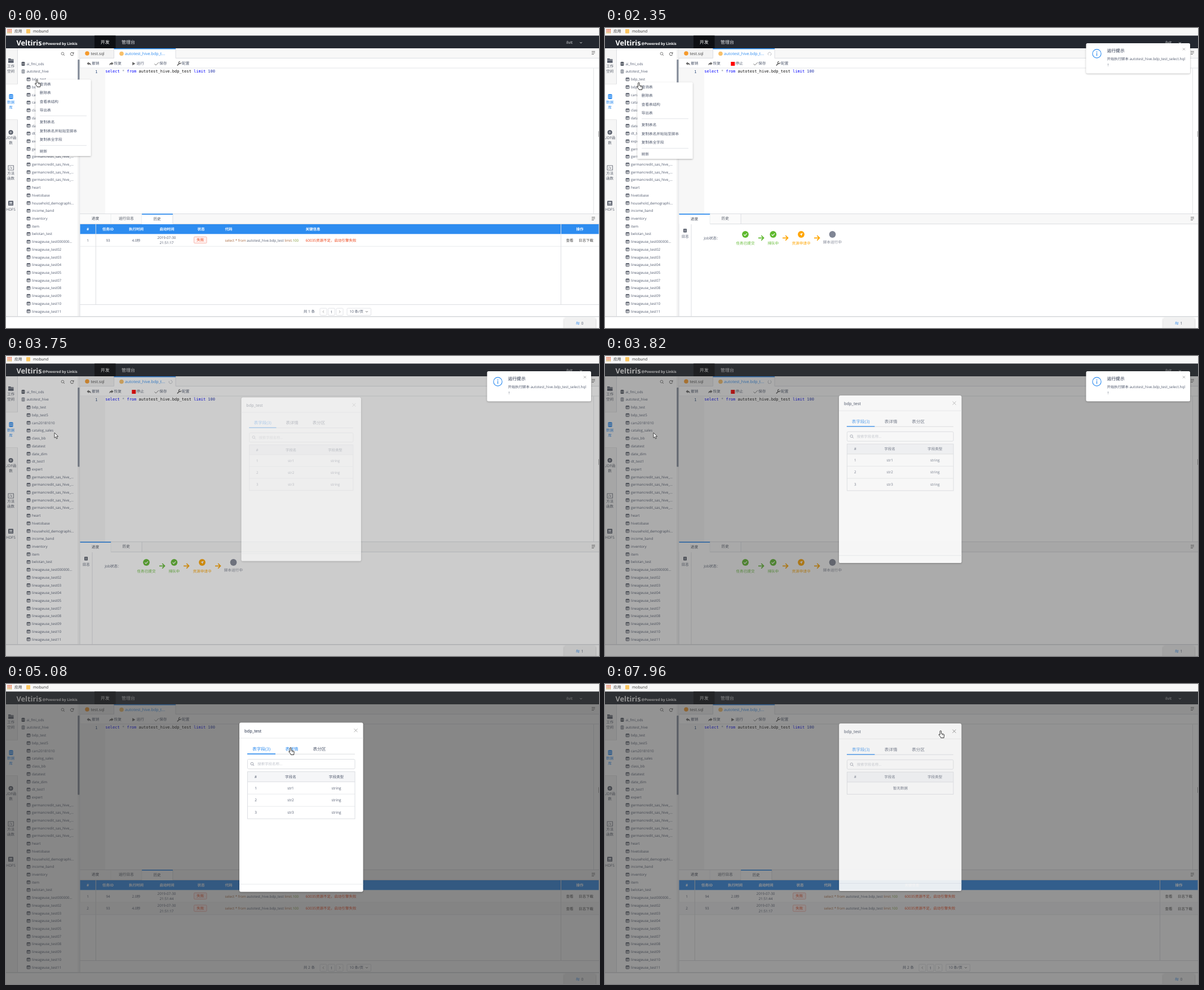
An HTML page that plays this animation: 1052x532 px, repeating every 8 s.

```html
<!DOCTYPE html>
<html lang="zh-CN">
<head>
<meta charset="utf-8">
<title>SQL workbench</title>
<style>
html, body { margin: 0; width: 100%; height: 100%; overflow: hidden; background: #fff; }
svg { display: block; width: 100%; height: 100%; }
text { font-family: "Open Sans", "Noto Sans CJK SC", "Noto Sans CJK", sans-serif; text-rendering: geometricPrecision; white-space: pre; }
.code { font-family: "DejaVu Sans Mono", "Noto Sans Mono", monospace; }
</style>
</head>
<body>
<svg id="stage" viewBox="0 0 1052 532" xmlns="http://www.w3.org/2000/svg"></svg>
<script>
const LOOP = 8000, BLUE = '#2d8cf0', INK = '#515a6e', LINE = '#dcdee2';
const GREEN = '#5fb92f', ORANGE = '#ffa500', GREY = '#808695';

// Drawing helpers; text y is the middle of the line
const rect = (x, y, w, h, fill, more = '') => `<rect x="${x}" y="${y}" width="${w}" height="${h}" fill="${fill}" ${more}/>`;
const line = (x1, y1, x2, y2, c = LINE, w = 1) => `<path d="M${x1} ${y1}L${x2} ${y2}" stroke="${c}" stroke-width="${w}"/>`;
const dot = (x, y, r, fill, more = '') => `<circle cx="${x}" cy="${y}" r="${r}" fill="${fill}" ${more}/>`;
const stroke = (d, c, w = 1) => `<path d="${d}" fill="none" stroke="${c}" stroke-width="${w}"/>`;
const shape = (d, c) => `<path d="${d}" fill="${c}"/>`;
const text = (x, y, s, size = 6.5, fill = INK, more = '') =>
  `<text x="${x}" y="${y + size * .36}" font-size="${size}" fill="${fill}" ${more}>${s}</text>`;
const mid = (x, y, s, size, fill, more = '') => text(x, y, s, size, fill, 'text-anchor="middle" ' + more);
const group = (id, body, more = '') => `<g id="${id}" ${more}>${body}</g>`;
const span = (s, c) => `<tspan fill="${c}">${s}</tspan>`;
const at = (x, y, body) => `<g transform="translate(${x} ${y})">${body}</g>`;

const lens = (x, y, c) => dot(x - .6, y - .6, 2.3, 'none', `stroke="${c}" stroke-width=".8"`) + line(x + 1.1, y + 1.1, x + 3, y + 3, c, .9);
const lines3 = (x, y) => [-2.5, 0, 2.5].map((d, i) => line(x - 3, y + d, x + (i == 2 ? 1 : 3), y + d, '#666', .9)).join('');
const cross = (x, y, r, c) => stroke(`M${x - r} ${y - r}l${2 * r} ${2 * r}m0 ${-2 * r}l${-2 * r} ${2 * r}`, c, .8);
const chevron = (x, y, c) => stroke(`M${x - 2} ${y - 1}l2 2l2 -2`, c, .8);
const disks = (x, y, c) => rect(x - 3, y - 3.5, 6, 7, c, 'rx="1.6"') + line(x - 3, y - 1, x + 3, y - 1, '#fff', .6) + line(x - 3, y + 1.2, x + 3, y + 1.2, '#fff', .6);
const grid = (x, y) => rect(x - 2.9, y - 2.6, 5.8, 5.4, '#fff', 'stroke="#555b68" stroke-width=".9" rx=".8"') +
  rect(x - 2.9, y - 2.6, 5.8, 1.8, '#555b68') + line(x - 2.9, y + 1, x + 2.9, y + 1, '#555b68', .6) + line(x - .8, y - 1, x - .8, y + 2.8, '#555b68', .6);

function topBars() {
  let s = rect(0, 0, 1052, 14, '#f7f7f7');
  const hues = ['#e8663c', '#e8663c', '#d9a03a'];
  for (let i = 0; i < 9; i++) s += rect(2.5 + i % 3 * 2.8, 1.8 + (i / 3 | 0) * 2.8, 1.9, 1.9, hues[i / 3 | 0]);
  s += text(15, 6, '应用', 6.8, '#333') + rect(36, 2, 7, 7.5, '#fbc661', 'rx=".8"') + text(48, 6, 'mobund', 6.8, '#333');
  s += rect(0, 13.5, 1052, 22.5, '#23272f') + rect(157, 13.5, 37.5, 22.5, '#0d0f13');
  s += text(18.5, 26, 'Veltiris', 12.8, '#fff', 'font-weight="700"') + text(64.5, 28, '@Powered by Linkis', 6.3, '#fff', 'font-weight="700"');
  s += mid(175.7, 25, '开发', 8, '#fff', 'font-weight="500"') + mid(217, 25, '管理台', 8, '#e3e5e8');
  return s + text(994, 25, 'ilvit', 7, '#e3e5e8') + chevron(1020, 26, '#e3e5e8');
}

function sideBar() {
  const item = (y, a, b, c = '#555b68') => mid(8.6, y, a, 6.6, c) + mid(8.6, y + 9, b, 6.6, c);
  let s = rect(0, 36, 20.5, 476, '#f6f6f6') + rect(0, 99.5, 21, 63, '#fff') + line(20.5, 36, 20.5, 99.5) + line(20.5, 162.5, 20.5, 512);
  s += line(0, 99.5, 20.5, 99.5, '#e8e8e8') + line(0, 162.5, 20.5, 162.5, '#e8e8e8');
  s += shape('M4 54h4l1 1.2h4.5v6.6h-9.5z', '#555b68') + line(4, 57, 13.5, 57, '#f6f6f6', .6) + item(67.5, '工作', '空间');
  s += at(9, 121.5, `<g transform="scale(1.25)">${disks(0, 0, BLUE)}</g>`) + item(131.5, '数据', '库', BLUE);
  s += dot(8.6, 185, 2.9, 'none', 'stroke="#555b68" stroke-width="2.4"') + dot(8.6, 185, 1, '#555b68') + item(194.8, 'UDF函', '数');
  s += rect(4, 244, 9.5, 8, 'none', 'stroke="#555b68" stroke-width=".8"') + mid(8.7, 248, '/x', 6, '#555b68') + item(258, '方法', '函数');
  s += rect(4, 306.5, 9, 8.5, '#555b68', 'rx="1"') + rect(5.8, 308.5, 5.4, 3, '#cfd2d8') + line(5, 313.3, 12, 313.3, '#fff', .7);
  return s + mid(8.6, 321.7, 'HDFS', 6.4, '#555b68');
}

function tree() {
  const german = Array(5).fill('germancredit_sas_hive_...');
  const uses = ['000000...', '02', '03', '04', '05', '07', '08', '09', '10', '11'].map(n => 'lineageuse_test' + n);
  const names = ['bdp_test', 'bdp_test5', 'cars20181010', 'catalog_sales', 'class_bb', 'datatest', 'date_dim', 'dt_test1', 'expert',
    ...german, 'heart', 'hivetobase', 'household_demographi...', 'income_band', 'inventory', 'item', 'belotan_test', ...uses];
  let s = lens(101, 46, '#666') + stroke('M119.3 44.6a2.7 2.7 0 1 0 .4 2.2', '#444', .9) + shape('M120.4 42.8v2.8h-2.8z', '#444');
  s += disks(30.5, 63.5, '#444a55') + text(36.5, 63.5, 'ai_fmi_ods', 6.3);
  s += disks(30.5, 77, '#8a8f99') + text(36.5, 77, 'autotest_hive', 6.3);
  names.forEach((n, i) => { const y = 91 + i * 13.71; s += grid(40, y) + text(46, y, n, 6.25); });
  return s + rect(127, 36, 4, 476, '#f3f3f3') + rect(127.3, 56, 3.4, 140.5, '#838b99', 'rx="1"') + line(131, 36, 131, 512);
}

function editor() {
  let s = rect(131.5, 36, 920, 17.5, '#f8f8f8') + rect(131.5, 36, 60, 17.5, '#f3f3f3') + rect(191.5, 36, 109.5, 18, '#fff');
  s += line(191.5, 36, 191.5, 53.5) + line(301, 36, 301, 53.5) + line(131, 53.5, 191.5, 53.5) + line(301, 53.5, 1052, 53.5);
  s += rect(191.5, 36, 109.5, 1.6, BLUE) + dot(144, 45, 3.8, '#f59a2c') + text(150.5, 45, 'test.sql', 7.2, '#444');
  s += dot(205, 45.5, 3.8, '#f7c06a') + text(211, 45.5, 'autotest_hive.bdp_t...', 7.15, BLUE) + lines3(1042, 44);
  s += line(131, 71, 1052, 71, '#e3e5e8');
  const undo = 'M0 -.3l3.2 -3v1.8q3.8 0 4 4.4q-1.2 -2 -4 -2v1.8z';
  s += at(143.5, 63.3, shape(undo, '#666')) + text(152, 63, '撤销', 6.7);
  s += at(190.5, 63.3, `<g transform="scale(-1 1)">${shape(undo, '#666')}</g>`) + text(191.5, 63, '恢复', 6.7);
  s += stroke('M263.5 63.5l2.4 2.4l5 -5', '#666', .9) + text(272, 63, '保存', 6.7);
  s += stroke('M303.8 66.5l4 -4', '#555', 1.5) + stroke('M310.5 61.2a2 2 0 1 1 -1.8 -1.8', '#555', 1.2) + text(312, 63, '配置', 6.7);
  s += rect(131.5, 71.5, 44.5, 258, '#f7f7f7') + mid(160.3, 77, '1', 7, '#2b4a7a', 'class="code"');
  const sql = span('select', '#0000ff') + span(' * ', '#778899') + span('from', '#0000ff') + ' autotest_hive.bdp_test ' +
    span('limit', '#0000ff') + span(' 100', '#2233aa');
  s += text(176.3, 76.7, sql, 7.04, '#111', 'class="code"');
  s += line(1042.5, 71, 1042.5, 329, '#e3e5e8') + line(1051.5, 183, 1051.5, 193, '#aaa');
  s += group('play', shape('M224.2 60.2l5.2 3l-5.2 3z', '#666') + text(231.5, 63, '运行', 6.7));
  s += group('stop', rect(223.3, 60, 7, 7, '#f00', 'rx=".6"') + text(231.5, 63, '停止', 6.7));
  return s + group('spin', stroke('M2.9 0a2.9 2.9 0 1 1 -1.2 -2.35', '#b9bcc2', .9));
}

function panelTabs(names, active) {
  let s = rect(131.5, 330, 920, 17.5, '#f8f8f8') + line(131, 329.5, 1052, 329.5) + line(131, 347.5, 1052, 347.5);
  names.forEach((n, i) => {
    const x = 131.5 + i * 54.8, on = i == active;
    s += rect(x, 330, 54.8, on ? 18 : 17, on ? '#fff' : '#fbfbfb') + line(x + 54.8, 330, x + 54.8, 347.5);
    if (on) s += rect(x, 329.3, 54.8, 1.7, BLUE);
    s += mid(x + 27, on ? 339 : 338, n, 6.7, '#444b59');
  });
  return s + lines3(1042, 338);
}

function history(rows) {
  let s = panelTabs(['进度', '运行日志', '历史'], 2) + rect(131.5, 348, 920, 17.3, BLUE);
  const heads = [[145, '#'], [181, '任务ID'], [231, '执行时间'], [285.5, '启动时间'], [346, '状态'], [1018, '操作']];
  const bold = 'font-weight="700"';
  heads.forEach(([x, n]) => s += mid(x, 356.7, n, 6.5, '#fff', bold));
  s += text(388.5, 356.7, '代码', 6.5, '#fff', bold) + text(531.5, 356.7, '关键信息', 6.5, '#fff', bold);
  const sql = span('select * from', '#a8673c') + ' autotest_hive.bdp_test' + span(' limit', '#a8673c') + span('.100', '#7f9b35');
  rows.forEach(([id, cost, clock], i) => {
    const y = 376.3 + i * 21.7;
    if (i) s += rect(131.5, y - 10.8, 920, 21.7, '#f8f8f9');
    s += line(131, y + 10.9, 1052, y + 10.9, '#e8eaec') + mid(145, y, i + 1, 6.3) + mid(181, y, id, 6.3) + mid(231, y, cost + '秒', 6.3);
    s += mid(285, y - 5, '2019-07-30', 6.3) + mid(285, y + 4.8, clock, 6.3);
    s += rect(333.5, y - 6, 22.5, 11.3, '#fff1f0', 'rx="1.5" stroke="#f5a89c" stroke-width=".8"') + mid(344.7, y - .3, '失败', 6.5, '#ed4014');
    s += text(388.5, y, sql, 6.2) + text(531.5, y, '60035资源不足，启动引擎失败', 6.5, '#ed4014');
    s += mid(1000, y + .5, '查看', 6.6, '#444') + mid(1029, y + .5, '日志下载', 6.6, '#444');
  });
  return s + line(159.3, 348, 159.3, 490) + line(984.5, 348, 984.5, 490) + line(131, 490.5, 1052, 490.5);
}

function pager(n) {
  const box = (x, w) => rect(x, 497, w, 12.5, '#fff', `rx="1.5" stroke="${LINE}" stroke-width=".8"`);
  return mid(538, 503, `共 ${n} 条`, 6.6) + box(557, 12) + box(571.5, 12) + box(586, 12) + box(605, 42.5) +
    stroke('M564 501l-2 2.2l2 2.2M591 501l2 2.2l-2 2.2', '#999', .8) + mid(577.5, 503.2, '1', 6.5) +
    text(609.5, 503, '10 条/页', 6.5) + chevron(640, 503, '#666');
}

function progress(n, log) {
  const names = ['任务已提交', '排队中', '资源申请中', '脚本运行中'], xs = [249, 298.3, 348, 403.5], arrows = [277, 320, 376];
  const hue = i => i == n - 1 ? GREY : i == n - 2 ? ORANGE : GREEN;
  let s = text(175.3, 372.7, 'Job状态：', 6.5);
  for (let i = 0; i < n; i++) {
    s += dot(xs[i], 366, 5.9, hue(i)) + mid(xs[i], i == n - 1 ? 380 : 381.2, names[i], 6.6, hue(i));
    if (hue(i) == GREEN) s += stroke(`M${xs[i] - 2.8} 366.1l2 2l3.6 -3.8`, '#fff', 1.2);
    if (hue(i) == ORANGE) s += shape(`M${xs[i] + 2.8} 363.2l-2.4 5.8l-.8 -2.4l-2.5 -.8z`, '#fff');
    if (i < n - 1) {
      const c = hue(i) == ORANGE || hue(i + 1) == ORANGE ? ORANGE : GREEN;
      s += stroke(`M${arrows[i] - 5} 372.3h9.2m-4 -4.3l4.3 4.3l-4.3 4.3`, c, 1.7);
    }
  }
  s = at(log ? 0 : -20.6, 0, s);
  if (log) s += line(153, 348, 153, 512) + rect(139, 356, 6, 6.6, '#555b68', 'rx=".8"') + line(140.5, 358.2, 143.5, 358.2, '#fff', .7) +
    line(140.5, 360.2, 143.5, 360.2, '#fff', .7) + mid(142, 370, '日志', 6.6);
  return s;
}

const menuItems = [[100, '查询表'], [115, '删除表'], [130.5, '查看表结构'], [146, '导出表'], [167, '复制表名'],
  [182.5, '复制表名并粘贴至脚本'], [198, '复制表全字段'], [219, '刷新']];
const menu = () => rect(52.5, 91.5, 98, 135.5, '#fff', 'rx="1.5" filter="url(#shade)"') + line(60, 155.8, 143, 155.8, '#e3e5e8') + line(60, 208.3, 143, 208.3, '#e3e5e8') +
  menuItems.map(([y, n], i) => text(59.8, y, n, 6.65, INK, `id="item${i}"`)).join('');

const notice = () => rect(853.5, 27, 184.5, 53.3, '#fff', 'rx="2.5" filter="url(#shade)"') + dot(872.5, 45.5, 7.6, 'none', `stroke="${BLUE}" stroke-width="1.1"`) +
  dot(872.5, 42.3, .9, BLUE) + line(872.5, 44.3, 872.5, 49.5, BLUE, 1.2) + text(890.5, 40.5, '运行提示', 7.8, '#17233d', 'font-weight="500"') +
  text(890.5, 55, '开始执行脚本 autotest_hive.bdp_test_select.hql', 6.4) + text(891, 66, '！', 6.4) + cross(1027, 37.5, 2, '#999');

const tabNames = ['表字段(3)', '表详情', '表分区'], tabX = [453, 507, 556], barX = [428, 486, 536], barW = [50, 42, 40.5];
function modal() {
  const frame = h => rect(428.5, 155.5, 190.5, h, 'none', `stroke="${LINE}"`);
  let head = rect(428.5, 155.5, 190.5, 17.8, '#f5f6f8') + line(428, 173.4, 619, 173.4);
  [[443, '#'], [505, '字段名'], [586, '字段类型']].forEach(([x, n]) => head += mid(x, 164.5, n, 6.6, INK, 'font-weight="500"'));
  const rows = [1, 2, 3].map(i => {
    const y = 162.4 + i * 21.8;
    return mid(443, y, i, 6.4) + mid(505, y, 'str' + i, 6.4) + mid(586, y, 'string', 6.4) + (i < 3 ? line(428, y + 11, 619, y + 11, '#e8eaec') : '');
  }).join('');
  const search = rect(428.5, 133.5, 190.5, 17, '#fff', `rx="2" stroke="${LINE}"`) + lens(437, 142, GREY) + text(446, 142, '搜索字段名称...', 6.5, '#c0c4cc');
  const track = search + head + group('rows', rows + frame(83.5)) + group('none', mid(524, 184.3, '暂无数据', 6.6) + frame(39.8)) +
    text(433.5 + 2 * 200, 144, '暂无表分区数据', 6.65);
  return rect(414, 68.5, 219.5, 300, '#fff', 'rx="3" filter="url(#shade)"') +
    group('inner', text(423, 83, 'bdp_test', 7.5, '#17233d') + group('close', cross(620.5, 82.3, 3, 'currentColor')) +
      line(414, 96, 633.5, 96, '#e8eaec') + line(414, 355, 633.5, 355, '#e8eaec') + line(428, 124.3, 619, 124.3) +
      tabNames.map((n, i) => mid(tabX[i], 115, n, 7.7, INK, `id="tab${i}"`)).join('') +
      rect(428, 123.2, 50, 1.6, BLUE, 'id="bar"') + `<g clip-path="url(#body)">${group('track', track)}</g>`);
}

const hand = '<path d="M-1.3 1a1.2 1.2 0 0 1 2.4 0v4l4 .9q1.4 .5 1.2 2l-.6 3v1.6h-5.4l-.3 -1.4l-3.2 -3.8q-.4 -1.3 1 -1l1 .9z" fill="#fff" stroke="#222" stroke-width=".9"/>' + stroke('M2.6 6v2M4.4 6.4v1.8', '#222', .6);
const arrow = '<path d="M0 0v9.2l2.1 -1.9l1.5 3.5l1.6 -.7l-1.5 -3.4h2.9z" fill="#fff" stroke="#222" stroke-width=".8"/>';

document.getElementById('stage').innerHTML =
  `<defs><filter id="shade" x="-10%" y="-10%" width="120%" height="125%"><feDropShadow dx="0" dy="1" stdDeviation="1.8" flood-opacity=".3"/></filter>
  <clipPath id="body"><rect x="427.5" y="127" width="192.5" height="225"/></clipPath></defs>` +
  rect(0, 0, 1052, 532, '#fff') + topBars() + sideBar() + tree() + editor() +
  group('hist1', history([[93, '4.0', '21:51:17']]) + pager(1)) +
  group('run', panelTabs(['进度', '历史'], 0) + group('run1', progress(2)) + group('run2', progress(3, true)) + group('run3', progress(4, true))) +
  group('hist2', history([[94, '2.0', '21:51:44'], [93, '4.0', '21:51:17']]) + group('pager2', pager(2))) +
  rect(0, 512, 1052, 20, '#fff') + line(0, 511.8, 1052, 511.8, '#d5d7da', 1.4) +
  rect(990.5, 514, 55.5, 20, '#f1f1f1', 'rx="2" filter="url(#shade)"') + stroke('M1017.5 522.3h-5.6l1.6 -1.6M1011.2 524.6h5.6l-1.6 1.6', BLUE, .8) +
  text(1020.5, 523.3, '0', 6.8, INK, 'id="count"') +
  group('menu', menu()) + rect(0, 13.5, 1052, 518.5, '#373737', 'id="mask"') + group('modal', modal()) +
  group('notice', notice()) + group('hand', hand) + group('arrow', arrow);

const el = {};
document.querySelectorAll('[id]').forEach(e => el[e.id] = e);
const show = (id, on) => el[id].style.display = on ? '' : 'none';
const set = (id, k, v) => el[id].setAttribute(k, v);
const ramp = (t, a, b) => Math.min(1, Math.max(0, (t - a) / (b - a)));
const smooth = p => p * p * (3 - 2 * p);
const mix = (a, b, p) => a + (b - a) * p;

// Time, x, y of the pointer tip
const path = [[0, 55, 92], [380, 55, 92], [460, 60, 97], [2450, 60, 97], [3250, 86, 136], [4290, 86, 136], [5000, 505, 113],
  [5380, 505, 113], [5600, 572, 113], [6020, 572, 113], [6420, 437, 115], [7050, 437, 115], [7590, 575, 96], [7650, 575, 96], [7860, 595.5, 83], [LOOP, 595.5, 83]];
const clicks = [[5280, 0, 1], [5640, 1, 2], [6900, 2, 0]];

function pointer(t) {
  const i = Math.max(1, path.findIndex(k => k[0] > t)), a = path[i - 1], b = path[i], p = smooth(ramp(t, a[0], b[0]));
  return [mix(a[1], b[1], p), mix(a[2], b[2], p)];
}

function render(t) {
  const running = t >= 800 && t < 4140;
  show('hist1', t < 800); show('run', running); show('hist2', t >= 4140); show('pager2', t >= 4300);
  show('run1', t < 1700); show('run2', t >= 1700 && t < 2050); show('run3', t >= 2050);
  show('play', !running); show('stop', running); show('spin', running);
  set('spin', 'transform', `translate(292 46) rotate(${t * .36})`);
  el.count.textContent = t >= 1700 && t < 4300 ? 1 : 0;

  const [x, y] = pointer(t), pointing = !(t >= 3330 && t < 4850 || t >= 7150 && t < 7760);
  show('hand', pointing); show('arrow', !pointing);
  set('hand', 'transform', `translate(${x} ${y})`);
  set('arrow', 'transform', `translate(${x} ${y})`);

  const shift = t < 1500 ? 0 : 5;
  show('menu', t < 740 || t >= 2250 && t < 3360);
  set('menu', 'transform', `translate(${shift} ${shift})`);
  menuItems.forEach(([my], i) => set('item' + i, 'fill', Math.abs(y - my - shift) < 7.7 ? BLUE : INK));

  const come = ramp(t, 1720, 2020), go = ramp(t, 4600, 4880);
  const seen = (1 - (1 - come) ** 2) * (1 - go * go);
  show('notice', seen > 0);
  set('notice', 'transform', `translate(${(1 - seen) * 198} 0)`);
  set('notice', 'opacity', seen);

  const open = ramp(t, 3640, 3900), shut = 1 - ramp(t, 7880, 8130) ** 2;
  const p = (1 - (1 - open) ** 2) * shut, scale = .9 + .1 * p;
  set('mask', 'opacity', .6 * open * shut);
  show('modal', p > 0);
  set('modal', 'transform', `translate(524 218.5) scale(${scale}) translate(-524 -218.5)`);
  set('modal', 'opacity', p);
  set('inner', 'opacity', p * p);
  set('close', 'color', t > 7820 ? '#555' : '#999');

  let tab = 0, pos = 0, bx = barX[0], bw = barW[0];
  for (const [start, a, b] of clicks) if (t >= start) {
    const q = smooth(ramp(t, start, start + 280));
    tab = b; pos = mix(a, b, q); bx = mix(barX[a], barX[b], q); bw = mix(barW[a], barW[b], q);
  }
  set('bar', 'x', bx); set('bar', 'width', bw);
  set('track', 'transform', `translate(${-200 * pos} 0)`);
  tabX.forEach((tx, i) => set('tab' + i, 'fill', i == tab || Math.abs(x - tx) < 22 && y > 105 && y < 125 ? BLUE : INK));
  show('rows', t < 6900); show('none', t >= 6900);
}

const began = performance.now();
function frame() {
  render((performance.now() - began) % LOOP);
  requestAnimationFrame(frame);
}
frame();
</script>
</body>
</html>
```
